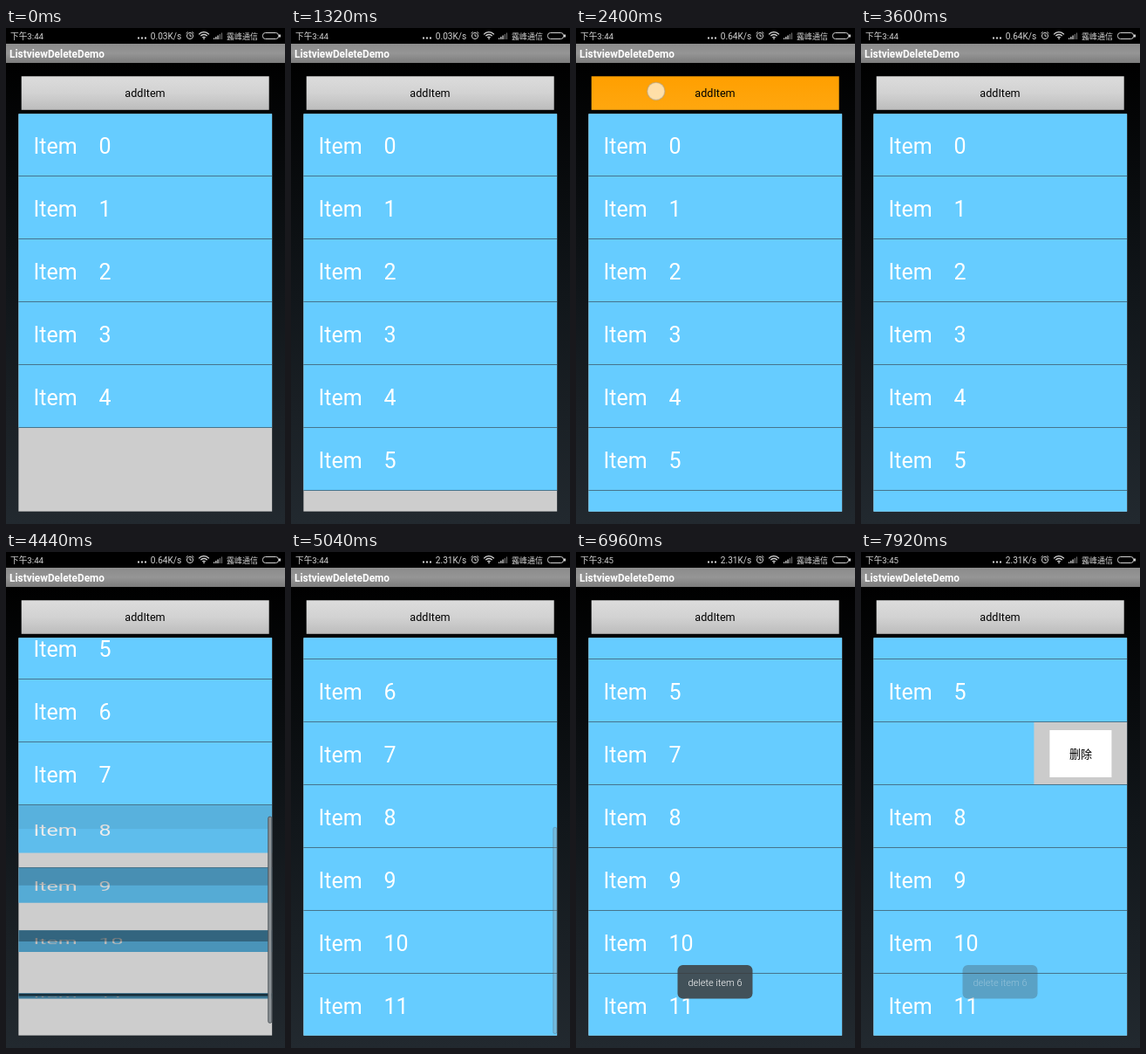
An HTML page with a canvas for the animation above (8 s loop, 320x568 px).

```html
<!DOCTYPE html>
<html lang="en">
<head>
<meta charset="utf-8">
<title>ListviewDeleteDemo</title>
<style>
html, body { margin: 0; width: 100%; height: 100%; overflow: hidden; background: #000; }
canvas { display: block; width: 320px; height: 568px; }
</style>
</head>
<body>
<canvas id="stage" width="320" height="568"></canvas>
<script>
const canvas = document.getElementById('stage');
const ctx = canvas.getContext('2d');
const LOOP = 8000, STEP = 120;
const FONT = 'Roboto, "Noto Sans CJK SC", "Noto Sans CJK JP", sans-serif';
const LIST = { x: 14.2, y: 98.3, w: 291.2, h: 455.5 };
const ROW = 72, FOLD = 330, PANEL = 107;

// Times at which the add button is down.
const presses = [[710, 880], [1430, 1590], [2270, 2450], [2620, 2750], [2860, 2990], [3100, 3230], [3350, 3490]];
// Scroll offset over time.
const scrollKeys = [[4060, 0], [4105, 49], [4190, 121], [4258, 193], [4330, 265], [4415, 337], [4440, 384], [4470, 407]];

const clamp = v => Math.max(0, Math.min(1, v));
const ramp = (t, a, b) => clamp((t - a) / (b - a));
const smooth = p => p * p * (3 - 2 * p);

function scrollAt(t) {
  let y = 0;
  for (let i = 1; i < scrollKeys.length; i++) {
    const [t0, y0] = scrollKeys[i - 1], [t1, y1] = scrollKeys[i];
    y += (y1 - y0) * ramp(t, t0, t1);
  }
  return y;
}

// Moment an item starts to unfold.
function bornAt(i) {
  if (i < 5) return -FOLD;
  if (i < 7) return [885, 1597][i - 5];
  return scrollKeys[i - 6][0];
}

function rect(x, y, w, h, fill) {
  ctx.fillStyle = fill;
  ctx.fillRect(x, y, w, h);
}

function gradient(y0, y1, ...colors) {
  const g = ctx.createLinearGradient(0, y0, 0, y1);
  colors.forEach((c, i) => g.addColorStop(i / (colors.length - 1), c));
  return g;
}

function pill(x, y, w, h, r) {
  ctx.beginPath();
  ctx.roundRect(x, y, w, h, r);
}

function label(str, x, y, size, color, align = 'left', weight = 400) {
  ctx.font = `${weight} ${size}px ${FONT}`;
  ctx.fillStyle = color;
  ctx.textAlign = align;
  ctx.fillText(str, x, y);
}

function arc(x, y, r, a = 0, b = Math.PI * 2) {
  ctx.beginPath();
  ctx.arc(x, y, r, a, b);
  ctx.stroke();
}

function statusBar(t) {
  const ink = '#d2d2d2';
  rect(0, 0, 320, 18, '#000');
  label('下午' + (t < 5400 ? '3:44' : '3:45'), 5, 12.7, 9.7, ink);
  for (let i = 0; i < 3; i++) rect(151 + i * 4, 10.5, 2, 2, ink);
  const speed = t < 2160 ? '0.03' : t < 4920 ? '0.64' : '2.31';
  label(speed + 'K/s', 165.8, 12.7, 10.1, ink);

  ctx.strokeStyle = ink;
  ctx.lineWidth = 1;
  arc(211, 9, 3.6);
  ctx.beginPath();
  ctx.moveTo(211, 6.8); ctx.lineTo(211, 9.2); ctx.lineTo(213, 9.2);
  ctx.moveTo(206.6, 6); ctx.lineTo(208.6, 4.3);
  ctx.moveTo(215.4, 6); ctx.lineTo(213.4, 4.3);
  ctx.stroke();

  ctx.lineWidth = 1.3;
  for (const r of [2.2, 5, 7.8]) arc(227, 12.5, r, -Math.PI * .77, -Math.PI * .23);
  rect(226.3, 11.5, 1.5, 1.5, ink);

  for (let i = 0; i < 5; i++) {
    const h = 1.5 + i * 1.5;
    rect(238 + i * 2.2, 13 - h, 1.3, h, i < 3 ? ink : '#666');
  }
  label('露峰通信', 253, 12.6, 9, ink);

  ctx.lineWidth = 1;
  pill(294.5, 5.5, 18, 7, 3);
  ctx.stroke();
  rect(313, 7.5, 2, 3, ink);
}

function titleBar() {
  rect(0, 18, 320, 22, gradient(18, 40, '#8b8b8b', '#959595', '#7c7c7c'));
  label('ListviewDeleteDemo', 4, 33.5, 11.85, '#fff', 'left', 700);
}

function addButton(down) {
  const fill = down ? gradient(55, 94, '#ff9f00', '#ffa70f') : gradient(55, 94, '#dcdcdc', '#d2d2d2', '#bcbcbc');
  rect(17.7, 55.3, 284, 38.5, fill);
  label('addItem', 159.5, 79.2, 12.6, '#000', 'center');
}

function touchDot(x, y) {
  ctx.beginPath();
  ctx.arc(x, y, 10, 0, Math.PI * 2);
  ctx.fillStyle = 'rgba(255,255,255,.65)';
  ctx.fill();
  ctx.strokeStyle = 'rgba(165,165,165,.5)';
  ctx.lineWidth = 1.3;
  ctx.stroke();
}

function drawRow(i, y, h, unfold, shift) {
  const { x, w } = LIST;
  ctx.save();
  ctx.beginPath();
  ctx.rect(x, y, w, h);
  ctx.clip();
  ctx.translate(0, y);
  ctx.scale(1, unfold);
  rect(x, 0, w, ROW, '#66ccff');
  label('Item    ' + i, 31.5 - shift, 46.4, 25, '#fff');
  if (unfold < 1) {
    const shade = .85 * Math.pow(1 - unfold, 1.3);
    rect(x, 0, w, 36, `rgba(0,0,0,${shade})`);
    rect(x, 36, w, 36, `rgba(0,0,0,${shade * .55})`);
  }
  if (shift > 0) {
    const px = x + w - shift;
    rect(px, 0, PANEL, ROW, '#cbcbcb');
    rect(px + 18, 9, 71, 54, '#fff');
    label('删除', px + 53.5, 41, 13, '#000', 'center');
  }
  ctx.restore();
}

function list(t) {
  const { x, y, w, h } = LIST;
  const gone = smooth(ramp(t, 6250, 6800));
  const shifts = {
    6: PANEL * ramp(t, 5405, 5515),
    7: PANEL * Math.pow(ramp(t, 7525, 7670), 2)
  };
  const scroll = scrollAt(t);
  ctx.save();
  ctx.beginPath();
  ctx.rect(x, y, w, h);
  ctx.clip();
  rect(x, y, w, h, '#cdcdcd');

  let top = 98 - scroll + ROW * gone;
  for (let i = 0; i < 12; i++) {
    const size = i === 6 ? ROW * (1 - gone) : ROW;
    const unfold = ramp(t, bornAt(i), bornAt(i) + FOLD);
    if (unfold > 0 && size > 1 && top < y + h && top + size > y) {
      drawRow(i, top, size - 1, unfold, shifts[i] || 0);
      rect(x, top + size - 1, w, 1, '#46748c');
    }
    top += size;
  }
  ctx.restore();

  const bar = ramp(t, 4060, 4100) * (1 - ramp(t, 4800, 5150));
  if (bar > 0) {
    ctx.globalAlpha = bar;
    pill(300.8, 98.5 + 218 * scroll / 409, 4, 236, 1.5);
    ctx.fillStyle = '#8c9296';
    ctx.fill();
    ctx.strokeStyle = '#4d555a';
    ctx.lineWidth = 1;
    ctx.stroke();
    ctx.globalAlpha = 1;
  }
}

function toast(t) {
  const alpha = ramp(t, 6230, 6470) * (1 - ramp(t, 7800, 7985));
  if (!alpha) return;
  ctx.globalAlpha = alpha;
  pill(116.5, 473, 86, 38.5, 6);
  ctx.fillStyle = 'rgba(60,60,60,.85)';
  ctx.fill();
  label('delete item 6', 159.5, 496.6, 11, '#fff', 'center', 300);
  ctx.globalAlpha = 1;
}

function draw(t) {
  const down = presses.some(([a, b]) => t >= a && t < b);
  rect(0, 0, 320, 568, gradient(40, 568, '#000', '#11161a', '#22292f'));
  statusBar(t);
  titleBar();
  addButton(down);
  list(t);
  toast(t);
  if (down) touchDot(91.8, 72.4);
  if (t >= 6120 && t < 6240) touchDot(253, 147);
}

const start = performance.now();
function tick() {
  const t = (performance.now() - start) % LOOP;
  draw(Math.floor(t / STEP) * STEP);
  requestAnimationFrame(tick);
}
tick();
</script>
</body>
</html>
```
